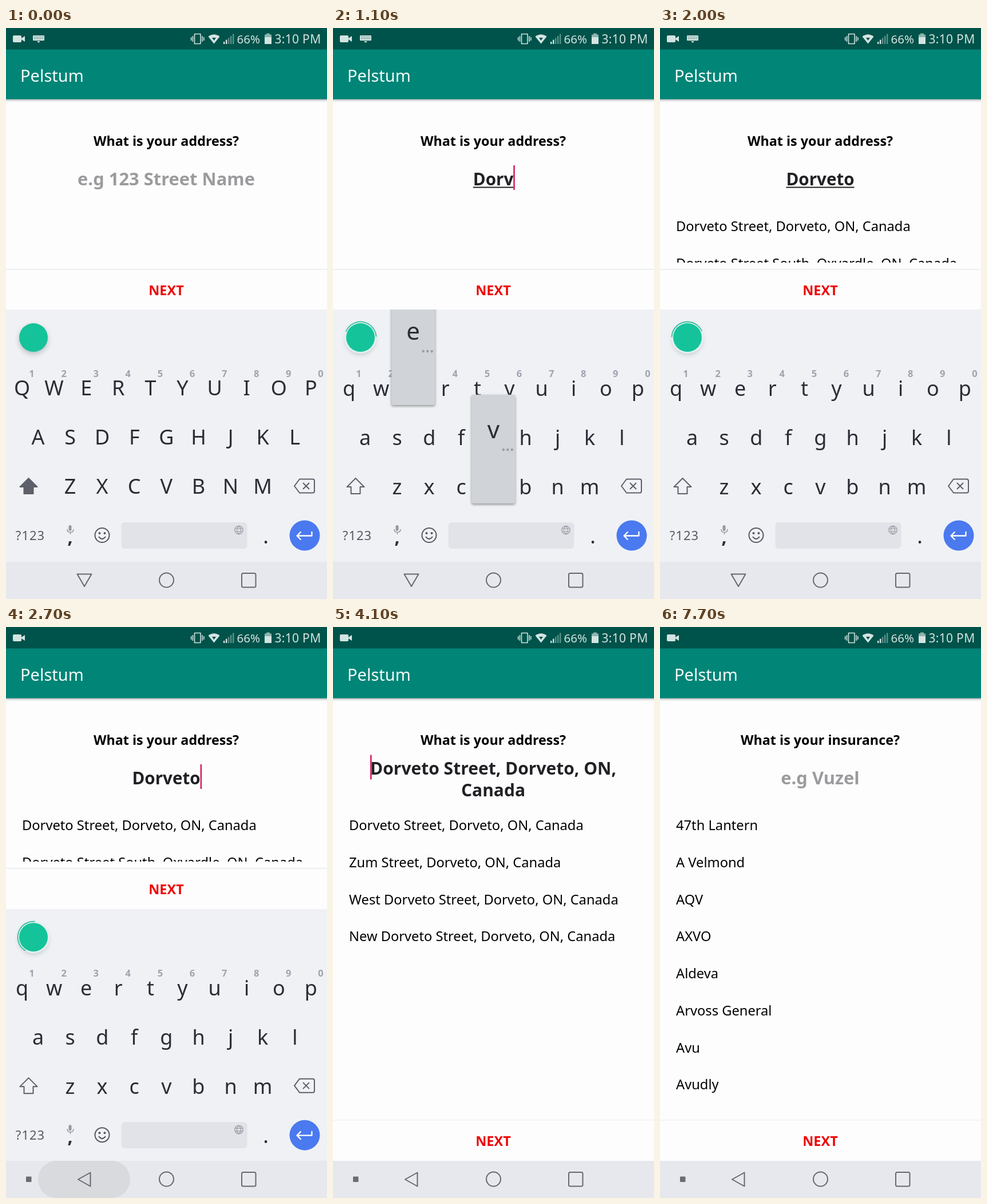
Recreate the animation shown at these times as an HTML page with a canvas. Size 561 by 998 pixels, loop 8000 ms.

```html
<!DOCTYPE html>
<html lang="en">
<head>
<meta charset="utf-8">
<title>Address form</title>
<style>
  html, body { margin: 0; width: 100%; height: 100%; overflow: hidden; background: #fefdfe; }
  canvas { display: block; }
</style>
</head>
<body>
<canvas id="stage" width="561" height="998"></canvas>
<script>
const c = document.getElementById('stage').getContext('2d');
const LOOP = 8000, INK = '#2b2d36', GREY = '#656872', PAPER = '#fefdfe', STATUS = '#d3e4e2';
const KEY_TOP = 492, NAV_TOP = 933, KEY_STEP = 56.1, ROW_STEP = 86;

const WORD = 'Dorveto';
const COMMITS = [200, 650, 850, 1000, 1150, 1350, 1470];
const ROWS = [['qwertyuiop', 28], ['asdfghjkl', 56], ['zxcvbnm', 112]];

const street = `${WORD} Street, ${WORD}, ON, Canada`;
const FIRST_LIST = [street, 'Dorv Road, Nelth Varn, ON, Canada'];
const WORD_LIST = [street, `${WORD} Street South, Oxvardle, ON, Canada`, 'West ' + street, 'New ' + street];
const PICKED_LIST = [street, `Zum Street, ${WORD}, ON, Canada`, 'West ' + street, 'New ' + street];
const INSURERS = ['47th Lantern', 'A Velmond', 'AQV', 'AXVO', 'Aldeva', 'Arvoss General', 'Avu', 'Avudly'];

const clamp = v => Math.max(0, Math.min(1, v));

function text(str, x, y, size, color, { weight = 400, align = 'left', spacing = 0 } = {}) {
  c.font = `${weight} ${size}px "Noto Sans", "Open Sans", sans-serif`;
  c.letterSpacing = spacing + 'px';
  c.textAlign = align;
  c.fillStyle = color;
  c.fillText(str, x, y);
  return c.measureText(str).width;
}

const centered = (str, y, size, color, weight = 700) =>
  text(str, 280, y, size, color, { weight, align: 'center' });

function rect(x, y, w, h, color, r = 0) {
  c.fillStyle = color;
  c.beginPath();
  c.roundRect(x, y, w, h, r);
  c.fill();
}

function disc(x, y, r, color) {
  c.fillStyle = color;
  c.beginPath();
  c.arc(x, y, r, 0, Math.PI * 2);
  c.fill();
}

function line(path, color = GREY, width = 2) {
  c.strokeStyle = color;
  c.lineWidth = width;
  c.lineJoin = 'round';
  c.stroke(new Path2D(path));
}

function shape(path, color) {
  c.fillStyle = color;
  c.fill(new Path2D(path));
}

const ring = (x, y, r) => `M${x - r} ${y}a${r} ${r} 0 1 1 ${2 * r} 0a${r} ${r} 0 1 1 ${-2 * r} 0`;

function shadowed(color, blur, dy, draw) {
  c.save();
  c.shadowColor = color;
  c.shadowBlur = blur;
  c.shadowOffsetY = dy;
  draw();
  c.restore();
}

function header(t) {
  shadowed('rgba(0,0,0,.35)', 4, 1.5, () => rect(-10, 0, 581, 124.5, '#008577'));
  rect(0, 0, 561, 37.5, '#00534a');
  rect(12, 13, 15, 12, STATUS, 2);
  shape('M27 18l6-4v10l-6-4z', STATUS);
  if (t < 2600) {
    rect(47, 13, 20, 9, STATUS, 1);
    for (let i = 0; i < 14; i++) rect(49 + i % 7 * 2.5, i < 7 ? 15 : 18, 1.1, 1.2, '#00534a');
    shape('M54 23h6l-3 3z', STATUS);
  }
  line('M329.5 10.5h10.5v17h-10.5zM326.5 14v10M343 14v10M323.7 16v6M345.8 16v6', STATUS, 1.6);
  shape('M353.5 15q10-7.5 20 0l-10 12.5z', STATUS);
  shape('M360 17h7l-3.5 5z', '#00534a');
  for (let i = 0; i < 5; i++)
    rect(380 + i * 4, 24 - i * 3.4, 2.4, 4 + i * 3.4, i < 2 ? STATUS : '#5b918a');
  text('66%', 403.5, 27, 20.5, STATUS);
  rect(455, 9.5, 6, 3, '#8fb4af');
  rect(452, 11.5, 12, 5, '#8fb4af');
  rect(452, 16, 12, 12, STATUS);
  text('3:10 PM', 469.5, 27, 21, STATUS, { spacing: .3 });
  text('Pelstum', 25, 93.5, 29, '#f4fbfa');
}

function list(items, bottom) {
  c.save();
  c.beginPath();
  c.rect(0, 325, 561, bottom - 325);
  c.clip();
  items.forEach((item, i) => text(item, 28, 355 + i * 64.75, 23.7, '#000'));
  c.restore();
}

const caret = (x, y) => rect(x, y, 2.6, 43, '#d32060');

function caretVisible(t) {
  if (t < 3900) return t < 2000 || (t >= 2500 && t < 3100) || t >= 3500;
  return Math.floor((t - 3900) / 500) % 2 === 0;
}

function addressForm(t, compact) {
  centered('What is your address?', 206, 23.3, '#000');
  const typed = WORD.slice(0, COMMITS.filter(at => t >= at).length);
  if (!typed) {
    centered('e.g 123 Street Name', 275, 30.9, '#9b9b9d');
  } else if (t < 3900) {
    const width = centered(typed, 275, 29.6, '#202124');
    if (t < 2500) rect(280 - width / 2, 277.5, width, 2, '#202124');
    if (caretVisible(t)) caret(280 + width / 2, 240);
  } else {
    const width = centered(`${WORD} Street, ${WORD}, ON,`, 258, 30, '#202124');
    centered('Canada', 296, 30, '#202124');
    if (caretVisible(t)) caret(280 - width / 2, 223.5);
  }
  const items = t < 1200 ? [] : t < 1900 ? FIRST_LIST : t < 4100 ? WORD_LIST : PICKED_LIST;
  list(items, compact ? 410 : 850);
}

function insuranceForm() {
  rect(0, 125, 561, 730, PAPER);
  centered('What is your insurance?', 206, 23.3, '#000');
  centered('e.g Vuzel', 275, 30.9, '#9b9b9d');
  list(INSURERS, 850);
}

function nextBar(compact) {
  const y = compact ? 421 : 861;
  rect(0, y, 561, 1.5, compact ? '#e8e9ed' : '#f1f1f3');
  centered('NEXT', y + 46, 23.5, '#ee0505');
}

function badge(t) {
  shadowed('rgba(60,80,90,.3)', 8, 4, () => disc(48, 541, 25, '#15c39a'));
  if (t < 400) return;
  // The busy ring speeds up once typing is over.
  const angle = (t < 1400 ? 90 + (t - 700) * .279 : 285 + (t - 1400) * .427) * Math.PI / 180;
  disc(48, 541, 28, '#e4f1ef');
  disc(48, 541, 25, '#15c39a');
  c.strokeStyle = '#35bfa0';
  c.lineWidth = 1.8;
  c.beginPath();
  c.arc(48, 541, 27.5, angle, angle + 2.7);
  c.stroke();
}

function keyPopup(letter) {
  const row = ROWS.findIndex(([keys]) => keys.includes(letter.toLowerCase()));
  const [keys, left] = ROWS[row];
  const x = left + keys.indexOf(letter.toLowerCase()) * KEY_STEP;
  const dy = row * ROW_STEP;
  shadowed('rgba(0,0,0,.4)', 4, 2, () => rect(x - 38, 469 + dy, 76, 190, '#d0d4d8', 3));
  text(letter, x, 545 + dy, 42, INK, { align: 'center' });
  for (let i = 0; i < 3; i++) disc(x + 17.5 + i * 7.5, 565 + dy, 2.2, '#989ca5');
}

function keyboard(t) {
  const upper = t < 400;
  c.save();
  c.beginPath();
  c.rect(0, KEY_TOP, 561, NAV_TOP - KEY_TOP);
  c.clip();
  c.translate(0, 441 * clamp((t - 2660) / 300) ** 3);
  rect(0, KEY_TOP, 561, 441, '#eff1f4');
  badge(t);

  ROWS.forEach(([keys, left], row) => [...keys].forEach((key, i) => {
    const x = left + i * KEY_STEP;
    text(upper ? key.toUpperCase() : key, x, (upper ? 642 : 643) + row * ROW_STEP, 36, INK, { align: 'center' });
    if (row === 0) text((i + 1) % 10, x + 17, 610, 16.5, '#a0a2ae', { weight: 600, align: 'center' });
  }));

  const shift = 'M39.5 787l15 15h-7v12h-16v-12h-7z';
  if (upper) shape(shift, '#5d606a');
  line(shift, '#5d606a');
  line('M513 788.5h23a3 3 0 0 1 3 3v18a3 3 0 0 1-3 3h-23l-9-12zM519 795l11 11M530 795l-11 11', '#5d606a');

  text('?123', 42.5, 895, 22, '#555863', { align: 'center', spacing: 1 });
  rect(109.5, 869, 5, 10, '#9698a4', 2.5);
  line('M107 876q0 5.5 5.5 5.5t5.5-5.5M112.5 881v4', '#9698a4', 1.5);
  text(',', 112, 901, 32, INK, { align: 'center', weight: 600 });
  line(ring(168, 886.5, 12.5) + 'M162 889q6 8 12 0', '#555863');
  disc(163.5, 883, 2, '#555863');
  disc(172.5, 883, 2, '#555863');
  rect(201.5, 864, 220, 46, '#e1e3e8', 6);
  line(ring(407, 877.5, 7.2) + 'M400 875h14M400 880h14M407 870q-7 7.5 0 15q7-7.5 0-15', '#9a9ca6', 1.2);
  text('.', 454, 901, 36, INK, { align: 'center' });
  disc(522, 887, 26.5, '#4a79f0');
  line('M534.5 880v7.5h-25M515.5 880.5l-7 7l7 7', '#fff', 2.3);

  if (t >= COMMITS[0])
    COMMITS.forEach((at, i) => { if (t > at - 90 && t < at + 130) keyPopup(WORD[i]); });
  c.restore();
}

function navBar(t) {
  rect(0, NAV_TOP, 561, 65, '#e7e8ed');
  c.globalAlpha = Math.min(clamp((t - 2450) / 150), clamp((3000 - t) / 250));
  rect(56, NAV_TOP, 161, 65, '#d9dadd', 32.5);
  c.globalAlpha = 1;
  const closing = t >= 2600;
  if (closing) rect(35, 960.5, 9.5, 9.5, '#6b6b72', 1);
  line(closing ? 'M126 965.5L147.5 953.5V977.5z' : 'M124.5 954.5H149.5L137 976z');
  line(ring(280.5, 965, 12.5));
  c.beginPath();
  c.roundRect(412, 953, 24.5, 24.5, 2.5);
  c.stroke();
}

function draw(t) {
  const compact = t < 2800;
  rect(0, 0, 561, 998, PAPER);
  addressForm(t, compact);
  c.globalAlpha = clamp((t - 6900) / 400);
  if (c.globalAlpha > 0) insuranceForm();
  c.globalAlpha = 1;
  nextBar(compact);
  if (t < 2960) keyboard(t);
  navBar(t);
  header(t);
}

const start = performance.now();
function tick() {
  draw((performance.now() - start) % LOOP);
  requestAnimationFrame(tick);
}
tick();
</script>
</body>
</html>
```
